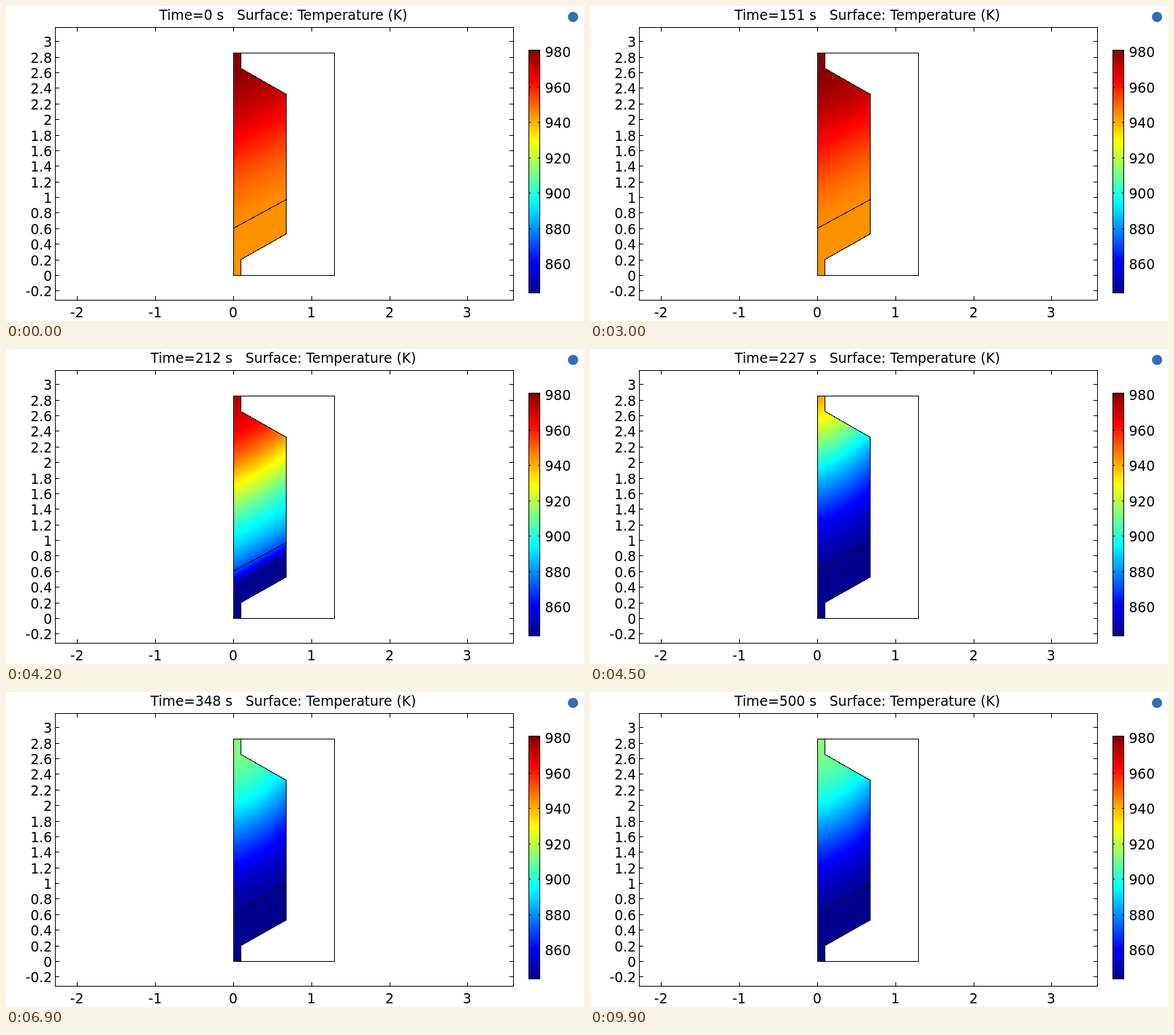
Animation of 791 by 432 pixels, one loop 10 s. Source, as an HTML page with a canvas:

```html
<!DOCTYPE html>
<html lang="en">
<head>
<meta charset="utf-8">
<title>Surface temperature</title>
<style>
  html, body { margin: 0; width: 791px; height: 432px; overflow: hidden; background: #fff; }
  canvas, svg { position: absolute; display: block; }
  canvas { left: 311px; top: 64px; clip-path: polygon(0 0, 11px 0, 11px 22px, 73px 57px, 73px 249px, 11px 284px, 11px 306px, 0 306px); }
  svg { left: 0; top: 0; }
  text { font: 18.6px "DejaVu Sans", sans-serif; fill: #000; white-space: pre; }
  .line { fill: none; stroke: #000; stroke-width: 1; shape-rendering: crispEdges; }
</style>
</head>
<body>
<canvas id="field" width="73" height="306"></canvas>
<svg id="plot" width="791" height="432" viewBox="0 0 791 432">
  <defs><linearGradient id="scale" x1="0" y1="1" x2="0" y2="0"></linearGradient></defs>
  <text id="title" x="379.5" y="19" text-anchor="middle" xml:space="preserve"></text>
  <rect x="715.5" y="60.5" width="15" height="333" fill="url(#scale)" stroke="#000"/>
  <path class="line" d="M311.5 64.5H449.5V369.5H311.5ZM321.5 64.5V85.5L383.5 121V312.5L321.5 347.7V369.5M311.5 304.7L383.5 265.5"/>
  <circle cx="776" cy="15" r="7" fill="#2f6fb5"/>
</svg>
<script>
const LOOP = 10000, STEP = 100, COUNT = 100, END_TIME = 500, SWITCH_TIME = 200;
const T_MIN = 843.9, T_MAX = 981.2;
const TOP = 64, W = 73, H = 306;

const plot = document.getElementById('plot');
const title = document.getElementById('title');
const ctx = document.getElementById('field').getContext('2d');
const image = ctx.createImageData(W, H);

const clamp = (v, a = 0, b = 1) => Math.min(b, Math.max(a, v));

function svg(tag, attrs, parent = plot) {
  const el = document.createElementNS('http://www.w3.org/2000/svg', tag);
  for (const key in attrs) el.setAttribute(key, attrs[key]);
  return parent.appendChild(el);
}

function label(text, x, y, anchor) {
  svg('text', { x, y, 'text-anchor': anchor }).textContent = text;
}

// Rainbow colour for a fraction between 0 and 1
function rainbow(f) {
  const part = centre => 255 * clamp(1.5 - Math.abs(4 * f - centre));
  const blue = f < 0.125 ? 139 + 928 * f : part(1);
  return [part(3), part(2), blue];
}

// Smooth curve through [position, value] points
function curve(points) {
  const n = points.length;
  const slope = i => {
    const a = points[Math.max(0, i - 1)], b = points[Math.min(n - 1, i + 1)];
    return (b[1] - a[1]) / (b[0] - a[0]);
  };
  return x => {
    if (x <= points[0][0]) return points[0][1];
    if (x >= points[n - 1][0]) return points[n - 1][1];
    let i = 0;
    while (points[i + 1][0] < x) i++;
    const [x0, y0] = points[i], [x1, y1] = points[i + 1];
    const h = x1 - x0, u = (x - x0) / h, w = 1 - u;
    return y0 * w * w * (1 + 2 * u) + y1 * u * u * (3 - 2 * u)
      + h * u * w * (slope(i) * w - slope(i + 1) * u);
  };
}

const coolProfile = curve([[65, 914], [90, 911.5], [115, 907], [155, 895], [190, 880], [237, 861], [275, 850], [305, 845], [322, 844]]);
const coolDelay = curve([[65, 28.6], [97, 24.8], [160, 17.4], [220, 14], [305, 10.7], [335, 4.9], [352, 4], [370, 3.9]]);

// Level lines climb to the right: straight while hot, bent near the top once cooled
const cells = [];
for (let y = 0; y < H; y++) {
  for (let x = 0; x < W; x++) {
    const row = TOP + y;
    const bend = 0.0032 + 0.0025 * clamp((266 - row) / 145);
    cells.push({
      cold: coolProfile(row + 0.3 * x + bend * x * x),
      share: (coolProfile(row + 0.53 * x) - 844) / 70,
      delay: coolDelay(row + 0.58 * x)
    });
  }
}

function drawField(time) {
  const rise = 37.5 - 1.2 * Math.exp(-time / 25);
  const since = Math.max(0, time - SWITCH_TIME);
  cells.forEach((cell, i) => {
    const hot = 944.3 + rise * cell.share;
    const left = Math.exp(-((since / cell.delay) ** 2.5));
    const temp = cell.cold + (hot - cell.cold) * left;
    const [r, g, b] = rainbow(clamp((temp - T_MIN) / (T_MAX - T_MIN)));
    image.data.set([r, g, b, 255], i * 4);
  });
  ctx.putImageData(image, 0, 0);
}

function drawAxes() {
  let d = 'M67.5 29.5H694.5V403.5H67.5Z';
  for (let i = -1; i <= 15; i++) {
    const y = Math.round(369 - 21.38 * i);
    d += `M67 ${y + 0.5}h6M695 ${y + 0.5}h-6`;
    label(String(+(i * 0.2).toFixed(1)), 63, y + 8, 'end');
  }
  for (let i = -2; i <= 3; i++) {
    const x = Math.round(311 + 106.8 * i);
    d += `M${x + 0.5} 29v6M${x + 0.5} 404v-6`;
    label(String(i), x, 427, 'middle');
  }
  for (let t = 860; t <= 980; t += 20) {
    const y = Math.round(62 + (980 - t) * 2.425);
    d += `M715 ${y + 0.5}h3M731 ${y + 0.5}h-3`;
    label(String(t), 737.5, y + 8, 'start');
  }
  svg('path', { d, class: 'line' });
}

function drawScale() {
  const gradient = document.getElementById('scale');
  for (const offset of [0, 0.125, 0.375, 0.625, 0.875, 1]) {
    svg('stop', { offset, 'stop-color': `rgb(${rainbow(offset).map(Math.round)})` }, gradient);
  }
}

let shown = -1;
function tick() {
  const index = Math.floor((performance.now() % LOOP) / STEP);
  if (index !== shown) {
    shown = index;
    const time = index * END_TIME / (COUNT - 1);
    title.textContent = `Time=${Math.floor(time)} s\u00a0\u00a0 Surface: Temperature (K)`;
    drawField(time);
  }
  requestAnimationFrame(tick);
}

drawScale();
drawAxes();
tick();
</script>
</body>
</html>
```
